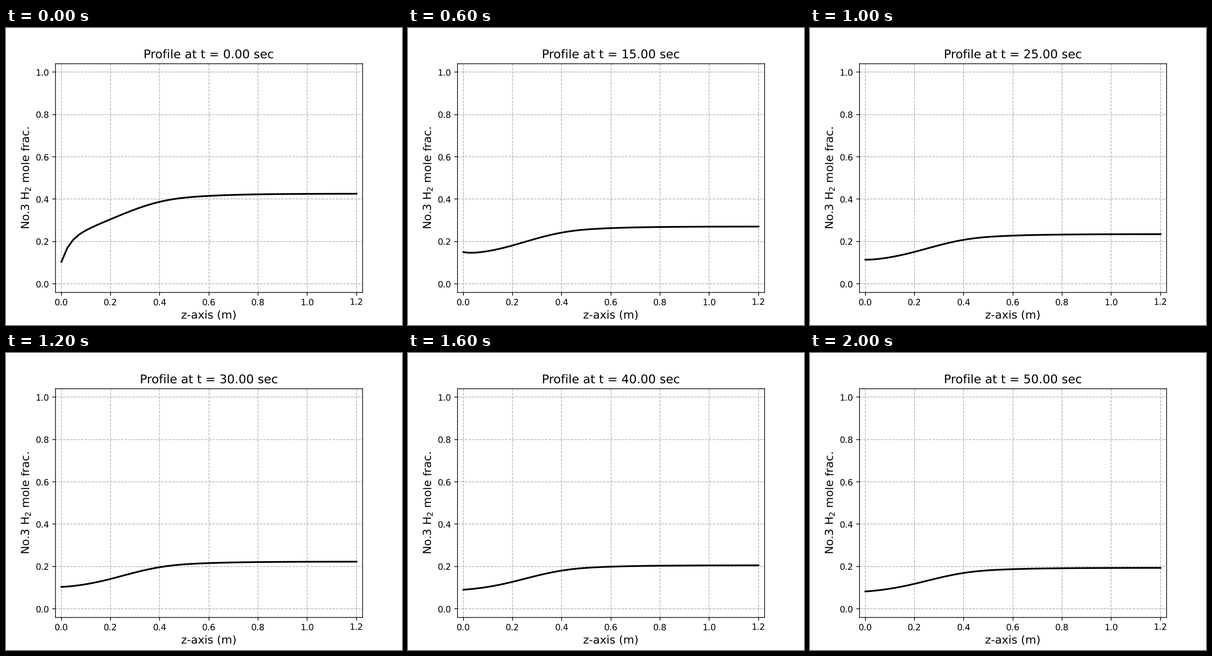
Write a matplotlib script that moves like this. It is 864 by 648 pixels and loops after 2.1 s.

```python
import numpy as np
import matplotlib.pyplot as plt
from matplotlib.animation import FuncAnimation

FRAMES, INTERVAL, DT = 21, 100, 2.5

z = np.linspace(0, 1.2, 51)


def front(z):
    """Depletion along the bed: a logistic front with a slower far tail."""
    bend = .096 * np.logaddexp(0, (z - .48) / .03)
    return 1.1 / (1 + np.exp(9.4 * z - 2.35 - bend))


def profile(t):
    level = .12 + (4.03 + .349 * t) ** -.85
    depth = .1 + .0495 * np.exp(-t / 34)
    start = np.exp(-t / 1.5)
    residue = .062 * np.exp(-z / .17) + .11 * np.exp(-z / .035)
    feed = .07 * (np.exp(-t / 8.3) - start)
    reach = .047 * np.exp(-t / 45)
    return level - depth * front(z) - start * residue + feed * np.exp(-z / reach)


plt.rcParams.update({"font.family": "DejaVu Sans", "text.hinting": "none"})
fig, ax = plt.subplots(figsize=(6.4, 4.8), dpi=135)
ax.set_xlim(-.024, 1.224)
ax.set_ylim(-.04, 1.04)
ax.set_xticks(np.arange(0, 1.3, .2))
ax.set_yticks(np.arange(0, 1.1, .2))
ax.grid(linestyle="--")
ax.set_xlabel("z-axis (m)", fontsize=13)
ax.set_ylabel("No.3 H$_2$ mole frac.", fontsize=13)
title = ax.set_title("", fontsize=14)
line, = ax.plot(z, profile(0), "k", linewidth=2)


def update(frame):
    t = frame * DT
    line.set_ydata(profile(t))
    title.set_text(f"Profile at t = {t:.2f} sec")
    return line, title


anim = FuncAnimation(fig, update, frames=FRAMES, interval=INTERVAL,
                     repeat=True, repeat_delay=0)
plt.show()
```
